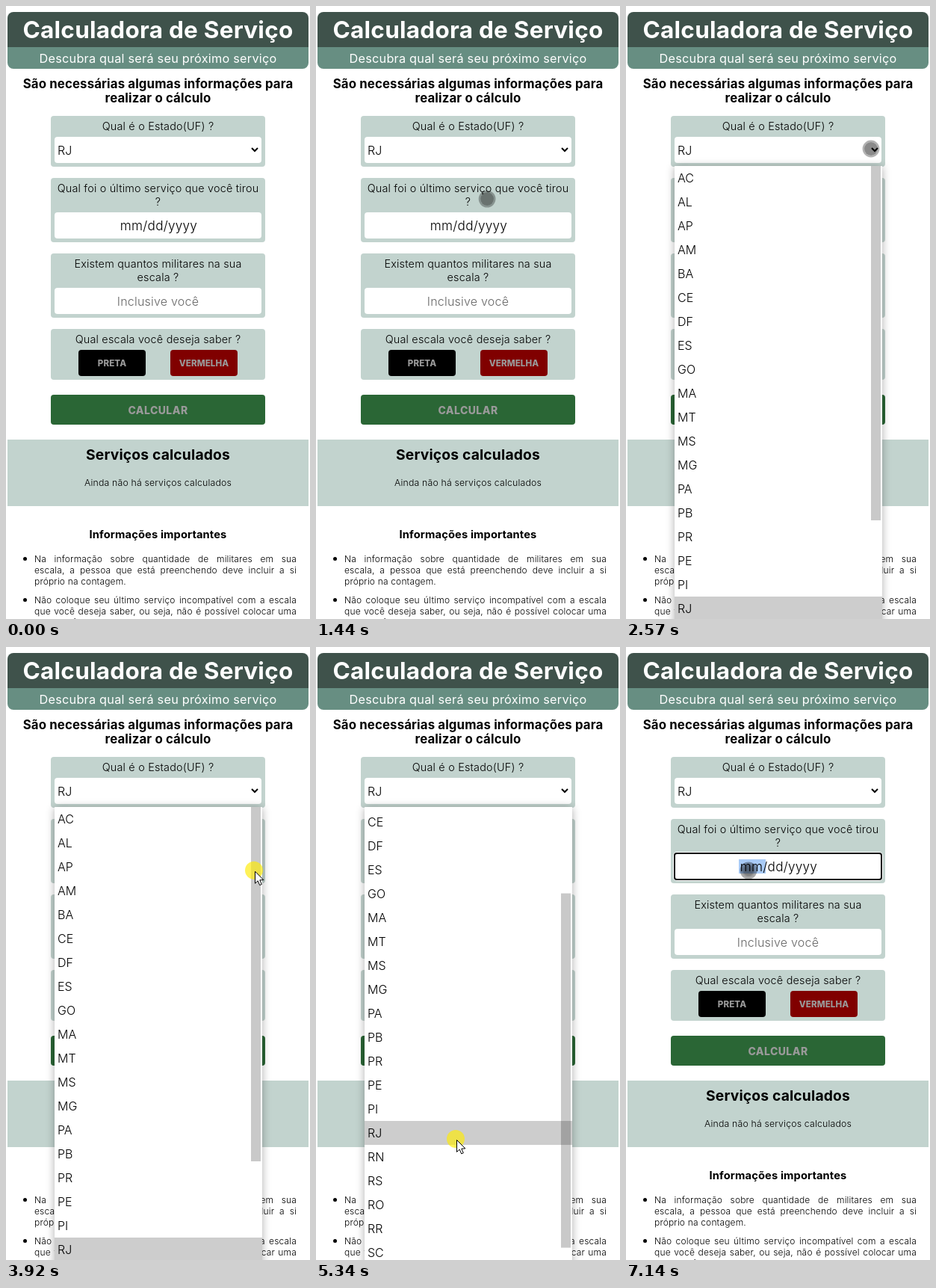
Animation, 407 px wide and 820 px high, one loop 8 s. Source, as an HTML page with a canvas:

```html
<!DOCTYPE html>
<html lang="pt-BR">
<head>
<meta charset="utf-8">
<title>Calculadora de Serviço</title>
<style>
  html, body { margin: 0; width: 100%; height: 100%; overflow: hidden; background: #fff; }
  #stage {
    position: absolute; left: 0; top: 0; width: 407px; height: 820px; overflow: hidden;
    font-family: Inter, "Open Sans", sans-serif; font-optical-sizing: none; color: #000;
  }
  #stage div, canvas { position: absolute; }
  .text { line-height: 20px; white-space: nowrap; font-weight: 300; letter-spacing: .014em; }
  .center { width: 400px; text-align: center; }
  .bold { font-weight: 700; letter-spacing: .008em; }
  .title { font-size: 31.5px; color: #fff; }
  .subtitle { font-size: 16.3px; font-weight: 400; color: #fff; }
  .lead { font-size: 16.8px; }
  .label { font-size: 14.4px; }
  .field { font-size: 16px; }
  .date { font-size: 17.2px; }
  .hint { font-size: 16px; color: #666; }
  .button { font-size: 11.6px; font-weight: 800; color: #999; }
  .submit { font-size: 14px; font-weight: 800; letter-spacing: .03em; color: #999; }
  .section { font-size: 19.3px; }
  .note { font-size: 12.3px; }
  .info { font-size: 14.7px; }
  .item { font-size: 12px; width: 351px; }
  .justify { text-align: justify; text-align-last: justify; }
  .focus {
    box-sizing: border-box; width: 279px; height: 37px; left: 64px;
    border: 2px solid #101010; border-radius: 4px; box-shadow: 0 0 0 1px #fff;
  }
  #popup {
    left: 65px; top: 214px; width: 278px; height: 640px; background: #fff;
    box-shadow: 0 1px 11px rgba(0, 0, 0, .32);
  }
  #view { left: 0; top: 0; width: 278px; height: 640px; overflow: hidden; }
  #list { left: 0; top: 0; width: 278px; }
  #stage #list div {
    position: static; height: 32px; line-height: 32px; padding-left: 4px;
    font-size: 16px; font-weight: 300;
  }
  #stage #list .chosen { background: #cdcdcd; }
  #thumb { left: 263px; top: 0; width: 13px; height: 474px; background: rgba(0, 0, 0, .21); }
  canvas { left: 0; top: 0; }
</style>
</head>
<body>
<div id="stage"></div>
<script>
const LOOP = 8000;
const ROW = 32, VIEW = 640, SCROLL = 156;
const MIDDLE = 203.5;
const CARD = "#c2d3ce";
const STATES = "AC AL AP AM BA CE DF ES GO MA MT MS MG PA PB PR PE PI RJ RN RS RO RR SC SP SE TO".split(" ");
const stage = document.getElementById("stage");

function add(parent, cls, style = {}, content = "") {
  const el = document.createElement("div");
  el.className = cls;
  el.textContent = content;
  Object.assign(el.style, style);
  return parent.appendChild(el);
}

function addNamed(parent, id) {
  const el = add(parent, "");
  el.id = id;
  return el;
}

function box(x, y, w, h, background, borderRadius = "4px") {
  return add(stage, "", {
    left: x + "px", top: y + "px", width: w + "px", height: h + "px", background, borderRadius
  });
}

// y is the middle of the capitals
function text(content, x, y, cls) {
  return add(stage, "text " + cls, { left: x + "px", top: y - 10 + "px" }, content);
}

function centered(content, y, cls, x = MIDDLE) {
  return text(content, x - 200, y, "center " + cls);
}

function buildHeader() {
  box(2, 8, 403, 47, "#3f524b", "8px 8px 0 0");
  box(2, 55, 403, 29, "#678e82", "0 0 8px 8px");
  centered("Calculadora de Serviço", 31.5, "bold title");
  centered("Descubra qual será seu próximo serviço", 69.5, "subtitle");
  centered("São necessárias algumas informações para", 103.5, "bold lead");
  centered("realizar o cálculo", 122.5, "bold lead");
}

function button(label, x, color) {
  box(x, 460, 90, 35, color);
  centered(label, 478, "bold button", x + 45);
}

function buildForm() {
  const groups = [
    ["Qual é o Estado(UF) ?"],
    ["Qual foi o último serviço que você tirou", "?"],
    ["Existem quantos militares na sua", "escala ?"],
    ["Qual escala você deseja saber ?"]
  ];
  let y = 147;
  groups.forEach((lines, i) => {
    const height = 50 + 18 * lines.length;
    box(60, y, 287, height, CARD);
    lines.forEach((line, n) => centered(line, y + 14 + 18 * n, "label"));
    if (i < 3) box(65, y + height - 40, 277, 35, "#fff");
    y += height + 15;
  });

  const mark = box(151, 284, 36, 19, "#a9cbf7", "0");
  text("RJ", 69, 192.5, "field");
  centered("mm/dd/yyyy", 294, "date", 204.5);
  centered("Inclusive você", 394.5, "hint");
  button("PRETA", 97, "#000");
  button("VERMELHA", 220, "#800000");
  box(60, 520, 287, 40, "#2a6635");
  centered("CALCULAR", 540.5, "submit");
  return mark;
}

function buildNotes() {
  box(2, 580, 403, 89, CARD, "0");
  centered("Serviços calculados", 600, "bold section");
  centered("Ainda não há serviços calculados", 637.5, "note");
  centered("Informações importantes", 706.5, "bold info");

  const items = [
    ["Na informação sobre quantidade de militares em sua",
      "escala, a pessoa que está preenchendo deve incluir a si",
      "próprio na contagem."],
    ["Não coloque seu último serviço incompatível com a escala",
      "que você deseja saber, ou seja, não é possível colocar uma",
      "data de final de semana e escolher a escala preta, sendo"]
  ];
  items.forEach((lines, i) => {
    const y = 739.5 + 55 * i;
    box(23, y - 2.5, 5, 5, "#000", "50%");
    lines.forEach((line, n) =>
      text(line, 38, y + n * 15.1, line.endsWith(".") ? "item" : "item justify"));
  });
}

function buildPopup() {
  const popup = addNamed(stage, "popup");
  const view = addNamed(popup, "view");
  const list = addNamed(view, "list");
  for (const name of STATES) add(list, name === "RJ" ? "chosen" : "", {}, name);
  return { popup, list, thumb: addNamed(view, "thumb") };
}

function buildCanvas() {
  const canvas = document.createElement("canvas");
  canvas.width = 407;
  canvas.height = 820;
  stage.appendChild(canvas);
  return canvas.getContext("2d");
}

function drawChevron(c) {
  c.lineWidth = 2;
  c.beginPath();
  c.moveTo(329, 190);
  c.lineTo(333, 194);
  c.lineTo(337, 190);
  c.stroke();
}

buildHeader();
const monthMark = buildForm();
buildNotes();
const selectFocus = add(stage, "focus", { top: "174px" });
const dateFocus = add(stage, "focus", { top: "275px" });
drawChevron(buildCanvas());
const { popup, list, thumb } = buildPopup();
const ctx = buildCanvas();

// Pointer strokes: each starts where the last one ended, bend is a curve's control point
const STROKES = [
  { from: 420, to: 690, end: [277, 288] },
  { from: 950, to: 1700, end: [276, 194], bend: [172, 311] },
  { from: 1700, to: 2040, end: [328, 191] },
  { from: 2850, to: 2970, end: [323, 271] },
  { from: 3250, to: 3530, end: [333, 271] },
  { from: 3820, to: 4260, end: [333, 396] },
  { from: 4390, to: 4460, end: [301, 441] },
  { from: 4460, to: 4940, end: [188, 659] },
  { from: 5740, to: 6030, end: [198, 249], bend: [275, 430] },
  { from: 6030, to: 6550, end: [164, 299] }
];

const progress = (t, from, to) => Math.min(1, Math.max(0, (t - from) / (to - from)));
const within = (t, from, to) => t >= from && t < to;
const mix = (a, b, f) => a.map((v, i) => v + (b[i] - v) * f);

function pointerAt(t) {
  let place = [381, 804];
  for (const { from, to, end, bend } of STROKES) {
    if (t < from) break;
    const f = progress(t, from, to);
    place = bend ? mix(mix(place, bend, f), mix(bend, end, f), f) : mix(place, end, f);
  }
  return place;
}

function disc(x, y, r, fill) {
  ctx.fillStyle = fill;
  ctx.beginPath();
  ctx.arc(x, y, r, 0, Math.PI * 2);
  ctx.fill();
}

function drawTouch(x, y) {
  disc(x, y, 9, "rgba(0,0,0,.46)");
  ctx.strokeStyle = "rgba(0,0,0,.3)";
  ctx.lineWidth = 2.4;
  ctx.beginPath();
  ctx.arc(x, y, 10.2, 0, Math.PI * 2);
  ctx.stroke();
}

function drawSoftTouch(x, y) {
  const g = ctx.createRadialGradient(x, y, 0, x, y, 11.5);
  g.addColorStop(0, "rgba(0,0,0,.54)");
  g.addColorStop(.55, "rgba(0,0,0,.5)");
  g.addColorStop(.75, "rgba(0,0,0,.37)");
  g.addColorStop(1, "rgba(0,0,0,.32)");
  disc(x, y, 11.5, g);
}

function drawArrow(x, y) {
  ctx.save();
  ctx.translate(x + .5, y + .5);
  const shape = new Path2D("M0 0V16L3.7 12.6L6.2 18.4L8.8 17.3L6.3 11.6L11.4 11.4Z");
  ctx.fillStyle = "#fff";
  ctx.strokeStyle = "#000";
  ctx.lineWidth = 1;
  ctx.fill(shape);
  ctx.stroke(shape);
  ctx.restore();
}

function drawPointer(t) {
  ctx.clearRect(0, 0, 407, 820);
  if (t < 420) return;
  const [x, y] = pointerAt(t);
  if (t < 2850) {
    drawTouch(x, y);
  } else if (t < 5540) {
    const pressed = within(t, 3790, 4260) || t >= 5340;
    if (pressed) disc(x - 1, y - 1, 12, "rgba(255,235,0,.65)");
    drawArrow(x, y);
  } else {
    drawSoftTouch(x, y);
  }
}

const show = (el, on) => { el.style.visibility = on ? "visible" : "hidden"; };

function render(t) {
  show(popup, within(t, 2430, 5540));
  show(selectFocus, within(t, 5540, 7140));
  show(dateFocus, t >= 7140);
  show(monthMark, t >= 7140);
  const scroll = SCROLL * progress(t, 3930, 4260);
  list.style.transform = `translateY(${-scroll}px)`;
  thumb.style.transform = `translateY(${scroll * VIEW / (STATES.length * ROW)}px)`;
  drawPointer(t);
}

const start = performance.now();
function tick() {
  render((performance.now() - start) % LOOP);
  requestAnimationFrame(tick);
}
tick();
</script>
</body>
</html>
```
